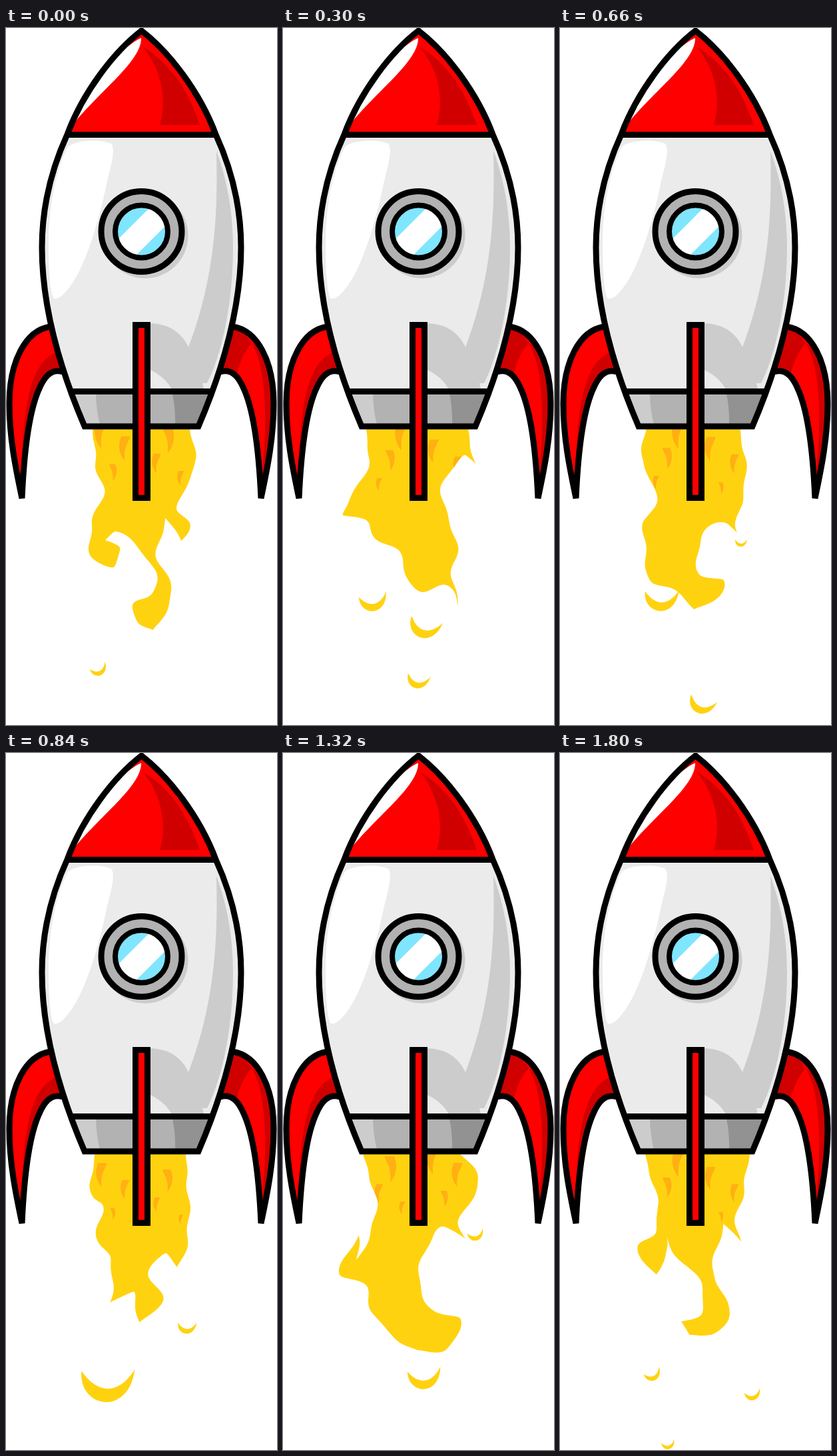
These frames come from a looping animation (407 px wide and 1048 px high, 1.86 s). An HTML page:

```html
<!DOCTYPE html>
<html lang="en">
<head>
<meta charset="utf-8">
<title>Rocket</title>
<style>
  html, body { margin: 0; width: 100%; height: 100%; overflow: hidden; background: #fff; }
  svg { display: block; width: 100vw; height: 100vh; }
  .line { stroke: #000; stroke-width: 9; }
</style>
</head>
<body>
<svg viewBox="0 0 407 1048">
  <defs>
    <path id="hull" d="M203.500 4C162 36 116 96 92 160C66 217 54 275 54 330C54 420 80 510 118 599H289C327 510 353 420 353 330C353 275 341 217 315 160C291 96 245 36 203.500 4Z"/>
    <path id="fin" d="M66 449C30 455 5 500 5 565C5 615 14 660 24 707C27 640 34 575 51 540C59 522 70 512 85 517"/>
    <clipPath id="inHull"><use href="#hull"/></clipPath>
    <clipPath id="inGlass"><circle cx="203.5" cy="306" r="39"/></clipPath>
    <clipPath id="inPlume"><path id="plumeEdge"/></clipPath>
  </defs>

  <path id="plume" fill="#ffd210"/>
  <g id="drops" fill="#ffd210"></g>
  <g clip-path="url(#inPlume)"><g id="embers" fill="#ffb012"></g></g>

  <use href="#fin" fill="red"/>
  <path fill="#d00000" d="M74 488C44 502 26 545 24 660C30 610 38 570 51 540C59 522 70 512 85 517Z"/>
  <use href="#fin" fill="none" class="line" stroke-linejoin="bevel"/>
  <use href="#fin" fill="red" transform="matrix(-1 0 0 1 407 0)"/>
  <path fill="#d00000" d="M341 449Q357 455 369 474Q354 490 347 518L322 517ZM369 474C391 510 394 590 383 690C394 650 402 615 402 565C402 520 390 485 369 474Z"/>
  <use href="#fin" fill="none" class="line" stroke-linejoin="bevel" transform="matrix(-1 0 0 1 407 0)"/>

  <g clip-path="url(#inHull)">
    <path fill="#ebebeb" d="M0 160H407V546H0Z"/>
    <path fill="red" d="M0 0H407V160H0Z"/>
    <path fill="#d00000" d="M205 28C232 60 243 105 231 146H291C275 98 250 55 205 28Z"/>
    <path fill="#fff" d="M203 15C170 30 118 90 100 146C140 95 204 50 203 15Z"/>
    <path fill="#fff" d="M92 180C100 169 140 166 158 174C164 180 160 200 152 230C142 280 125 340 105 375C90 400 80 408 72 407C66 400 64 360 64 330C63 270 75 215 92 180Z"/>
    <path fill="#ccc" d="M316 185C318 270 316 370 274 480C264 458 245 444 214 444V513C226 518 240 527 249 543H297L295 534H302C325 490 341 410 341 330C341 280 333 230 316 185Z"/>
    <path fill="#b2b2b2" d="M0 546H407V600H0Z"/>
    <path fill="#ccc" d="M0 546H135Q135 575 142 600H0Z"/>
    <path fill="#929292" d="M249 546H407V600H254Q255 570 249 546Z"/>
  </g>
  <use href="#hull" fill="none" class="line"/>
  <path class="line" d="M92 160.500H315M99 546.500H308"/>

  <circle cx="209" cy="312" r="64.5" fill="#ccc"/>
  <circle cx="203.5" cy="306" r="60.5" fill="#b2b2b2" class="line"/>
  <g clip-path="url(#inGlass)">
    <path fill="#80e5ff" d="M160 260H250V350H160Z"/>
    <path fill="#fff" d="M146 340L226 260H277L187 350Z"/>
  </g>
  <circle cx="203.5" cy="306" r="39.5" fill="none" class="line" style="stroke-width:8"/>
  <rect x="194.500" y="446.500" width="18" height="260" fill="red" class="line"/>
</svg>

<script>
const STEP = 60, STEPS = 31, NOZZLE = 603, FALL = 30, SAMPLES = 160;

// Key points of the flame's two sides, from the nozzle to the lowest tip.
const poses = [
  { at: 0,
    left: '130,603 136,660 146,697 128,748 130,795 160,811 173,782 148,770 162,757 222,815 222,850 190,868 196,893 222,905',
    right: '276,603 284,660 258,722 276,745 262,771 241,737 227,795 250,848 222,905' },
  { at: 5,
    left: '125,603 128,655 88,732 128,742 140,769 171,785 202,847 245,838 264,868',
    right: '278,603 287,655 274,642 239,690 261,780 254,825 264,868' },
  { at: 9,
    left: '127,603 117,645 146,716 112,750 114,825 147,862 206,886',
    right: '271,603 282,670 264,733 273,750 255,735 203,765 207,846 253,842 240,873 206,886' },
  { at: 14,
    left: '133,603 131,668 143,680 137,735 157,760 157,826 190,810 200,856',
    right: '270,603 272,735 259,773 238,752 215,785 236,825 200,856' },
  { at: 22,
    left: '120,603 140,690 112,762 113,725 85,785 122,800 135,842 175,885 205,898',
    right: '266,603 295,640 265,705 272,730 240,712 209,760 206,808 230,840 265,850 246,898 205,898' },
  { at: 26,
    left: '127,603 118,683 152,668 135,715 165,745 146,890 185,885 207,910',
    right: '274,603 264,650 270,740 234,820 234,895 207,910' },
  { at: 30,
    left: '128,603 143,720 116,740 143,784 160,760 152,705 163,740 212,800 212,843 180,855 196,875',
    right: '285,603 275,660 264,710 270,735 247,708 230,790 255,830 234,872 196,875' }
];

// Torn-off drops: when and where each is largest, and its radius.
const drops = [
  { at: 5, x: 136, y: 863, r: 21 },
  { at: 5, x: 213, y: 902, r: 24 },
  { at: 5, x: 203, y: 982, r: 17 },
  { at: 9, x: 213, y: 958, r: 24 },
  { at: 14, x: 153, y: 950, r: 40 },
  { at: 14, x: 272, y: 864, r: 14 },
  { at: 22, x: 213, y: 940, r: 25 },
  { at: 26, x: 290, y: 845, r: 34 },
  { at: 26, x: 163, y: 920, r: 28 },
  { at: 30.5, x: 140, y: 950, r: 13 }
];

const DROP = 'M-1-.5C-1.100 .9 .8 1.200 1-.6C.6 .1-.2 .6-1-.5Z';
const EMBER = 'M-8 0C-4 14 4 18 2 44C14 30 14 12 8 0Z';

const $ = id => document.getElementById(id);
const mix = (a, b, k) => a + (b - a) * k;
const clamp01 = v => Math.max(0, Math.min(1, v));
const random = seed => { const v = Math.sin(seed * 127.1) * 43758.5453; return v - Math.floor(v); };

function unit(x, y) {
  const size = Math.hypot(x, y) || 1;
  return [x / size, y / size];
}

// Smooth curve through key points; sharp turns stay corners.
function smooth(text) {
  const points = text.split(' ').map(pair => pair.split(',').map(Number));
  const last = points.length - 1;
  const tangents = points.map((p, i) => {
    const before = points[Math.max(0, i - 1)], after = points[Math.min(last, i + 1)];
    const a = unit(p[0] - before[0], p[1] - before[1]);
    const b = unit(after[0] - p[0], after[1] - p[1]);
    const softness = clamp01(0.6 + 1.5 * (a[0] * b[0] + a[1] * b[1]));
    return unit(a[0] + b[0], a[1] + b[1]).map(v => v * softness);
  });
  return Array.from({ length: SAMPLES }, (_, s) => {
    const u = s / (SAMPLES - 1) * last;
    const i = Math.min(last - 1, Math.floor(u)), t = u - i;
    const p = points[i], q = points[i + 1];
    const size = Math.hypot(q[0] - p[0], q[1] - p[1]);
    return [0, 1].map(c => mix(p[c], q[c], t * t * (3 - 2 * t))
      + size * (tangents[i][c] * t * (1 - t) ** 2 - tangents[i + 1][c] * t * t * (1 - t)));
  });
}

for (const pose of poses) pose.outline = [...smooth(pose.left), ...smooth(pose.right).reverse()];

function addPath(parent, d) {
  const path = document.createElementNS('http://www.w3.org/2000/svg', 'path');
  path.setAttribute('d', d);
  return $(parent).appendChild(path);
}

const place = (path, x, y, angle, sx, sy) =>
  path.setAttribute('transform', `translate(${x} ${y}) rotate(${angle}) scale(${sx} ${sy})`);

for (const drop of drops) drop.path = addPath('drops', DROP);
const embers = Array.from({ length: 7 }, () => addPath('embers', EMBER));

function drawPlume(step) {
  const index = poses.findLastIndex(pose => pose.at <= step);
  const from = poses[index], to = poses[(index + 1) % poses.length];
  const k = (step - from.at) / ((to.at || STEPS) - from.at);
  const outline = from.outline.map(([x, y], i) => {
    const px = mix(x, to.outline[i][0], k), py = mix(y, to.outline[i][1], k);
    const ripple = 2.5 * clamp01((py - NOZZLE) / 40);
    // Fifteen waves fit in one loop's fall, so the ripple repeats cleanly.
    const phase = (py - step * FALL) / (STEPS * FALL) * 15 * 2 * Math.PI;
    return (px + ripple * Math.sin(phase)).toFixed(1) + ' ' + py.toFixed(1);
  });
  for (const id of ['plume', 'plumeEdge']) $(id).setAttribute('d', 'M' + outline.join('L') + 'Z');
}

function drawDrops(step) {
  drops.forEach(({ at, x, y, r, path }, i) => {
    const age = (step - at + 1.5 * STEPS) % STEPS - STEPS / 2;
    const size = r * clamp01(1 - (age / 5) ** 2);
    place(path, x, y + age * FALL, (random(i + 1) - 0.5) * 50, size, size);
  });
}

function drawEmbers(step) {
  embers.forEach((path, i) => {
    const depth = (i * 0.618 + step * 5 / STEPS) % 1;
    const size = 1 - 0.7 * depth;
    const x = 142 + i * 20 + (random(i + 20) - 0.5) * 12;
    place(path, x, NOZZLE - 15 + depth * 110, 0, i % 2 ? size : -size, size);
  });
}

let shown = -1;
function tick() {
  const step = Math.floor(performance.now() / STEP) % STEPS;
  if (step !== shown) {
    shown = step;
    drawPlume(step);
    drawDrops(step);
    drawEmbers(step);
  }
  requestAnimationFrame(tick);
}
tick();
</script>
</body>
</html>
```
